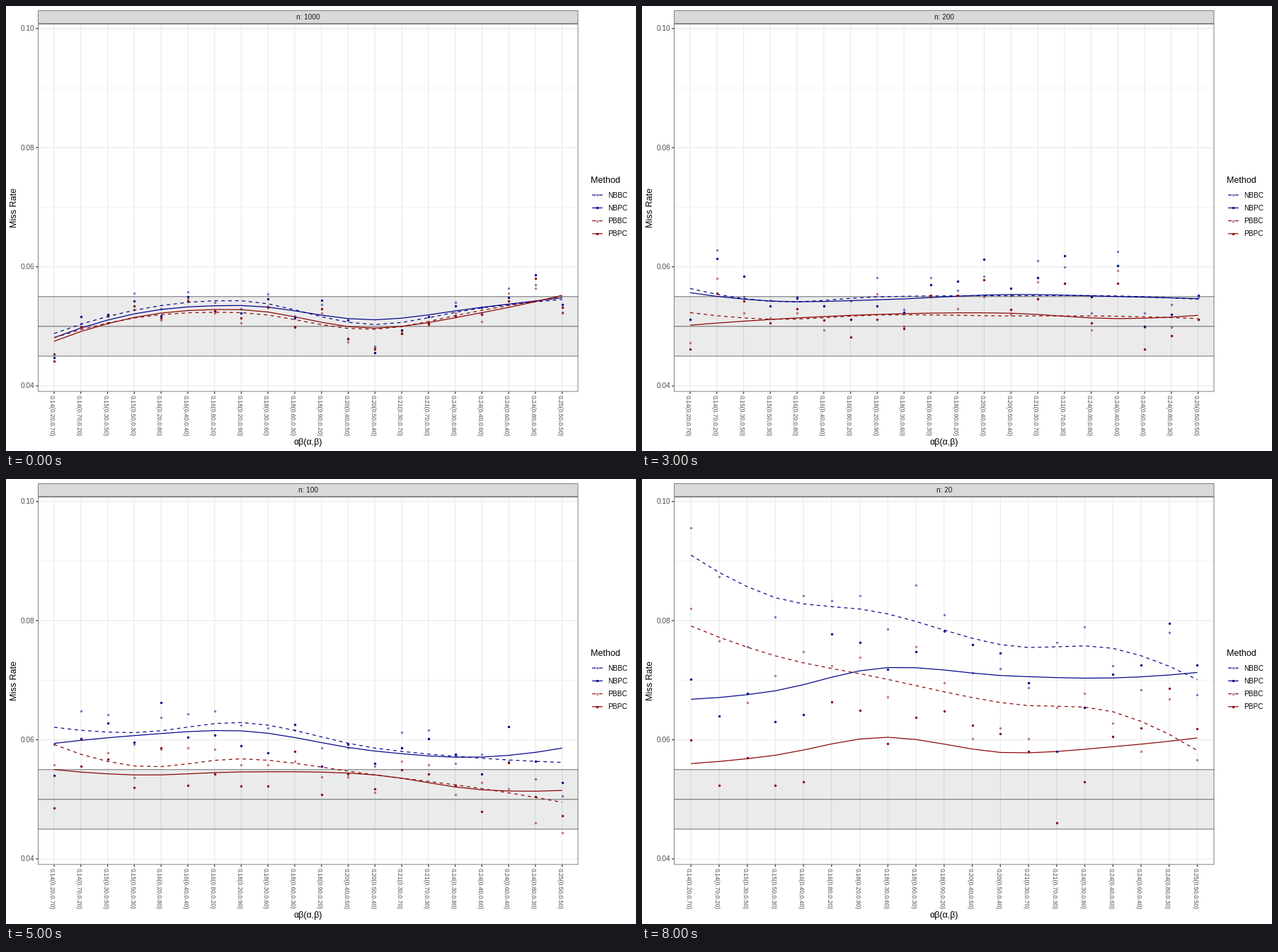
Recreate the animation shown at these times as a matplotlib script. Size 890 px wide and 629 px high, loop 9 s.

```python
import numpy as np
import matplotlib.pyplot as plt
from matplotlib.animation import FuncAnimation
from matplotlib.patches import Rectangle

W, H = 890, 629
PT = 0.72  # points per pixel at 100 dpi
LEFT, RIGHT, STRIP, TOP, BOTTOM = 45.3, 808.3, 6.3, 25.2, 545.2
MID = (LEFT + RIGHT) / 2
LINE = 1.21
GREY20, GREY30 = "#333333", "#4d4d4d"
NAVY, MAROON = "#00008b", "#8b0000"

# name, colour, line style, point opacity
METHODS = [
    ("NBBC", NAVY, (0, (4, 4)), 0.5),
    ("NBPC", NAVY, "-", 1),
    ("PBBC", MAROON, (0, (4, 4)), 0.5),
    ("PBPC", MAROON, "-", 1),
]

# Conditions: tenths (a, b) whose product lies between 0.14 and 0.25
PAIRS = sorted(((a, b) for a in range(2, 10) for b in range(2, 10)
                if 14 <= a * b <= 25), key=lambda p: (p[0] * p[1], p[0]))

# Key points of the trends along the axis, in units of 1e-4
KNOTS = np.array([0, 3, 7, 12, 16, 19]) / 19
TRENDS = {
    1000: ([488, 527, 543, 503, 531, 545], [481, 521, 535, 511, 532, 548],
           [481, 514, 523, 495, 527, 550], [475, 515, 528, 497, 523, 552]),
    250: ([524, 532, 549, 546, 545, 537], [511, 537, 550, 543, 546, 538],
          [495, 520, 533, 516, 521, 524], [476, 519, 533, 517, 516, 528]),
    150: ([603, 552, 550, 557, 557, 554], [602, 548, 539, 564, 554, 555],
          [551, 504, 505, 519, 513, 502], [528, 504, 507, 527, 510, 509]),
    100: ([621, 612, 629, 586, 569, 562], [594, 607, 615, 581, 571, 586],
          [592, 556, 568, 541, 518, 495], [550, 541, 546, 541, 516, 515]),
    50: ([649, 650, 674, 617, 626, 606], [617, 650, 650, 637, 643, 635],
         [592, 569, 583, 527, 543, 545], [522, 558, 572, 531, 545, 577]),
    20: ([910, 841, 815, 757, 752, 701], [668, 681, 720, 707, 704, 713],
         [791, 743, 705, 660, 645, 582], [560, 573, 604, 578, 589, 603]),
}
SIZES = [1000, 500, 250, 200, 150, 100, 75, 50, 20]


def trend(size):
    """Key points of one sample size, or the mean of its neighbours'."""
    if size in TRENDS:
        return np.array(TRENDS[size], float)
    i = SIZES.index(size)
    return (trend(SIZES[i - 1]) + trend(SIZES[i + 1])) / 2


def smooth(values, u):
    """Cubic Hermite curve through the key points."""
    slope = np.gradient(values, KNOTS, edge_order=2)
    i = np.clip(np.searchsorted(KNOTS, u) - 1, 0, len(KNOTS) - 2)
    h = KNOTS[i + 1] - KNOTS[i]
    t = (u - KNOTS[i]) / h
    return (values[i] * (1 + 2 * t) * (1 - t) ** 2
            + values[i + 1] * t * t * (3 - 2 * t)
            + h * t * (1 - t) * (slope[i] * (1 - t) - slope[i + 1] * t))


def scatter(curves, size):
    """Rates around the curves; methods agree more as the sample grows."""
    rng = np.random.RandomState(size)
    count = curves.shape[1]
    shared = rng.normal(0, 28, count)
    kind = rng.normal(0, 150 / np.sqrt(size), (2, count))
    own = rng.normal(0, 5, (4, count))
    rates = curves + shared + np.tile(kind, (2, 1)) + own
    return np.clip(2 * np.round(rates / 2), 420, 980)


plt.rcParams["font.family"] = "Liberation Sans"
plt.rcParams["path.snap"] = False
fig = plt.figure(figsize=(W / 100, H / 100), dpi=100, facecolor="white")
ax = fig.add_axes([0, 0, 1, 1])


def ypos(rate):
    return 368.6 - 0.842 * (np.asarray(rate) - 600)


def line(x, y, color, width=LINE, **kw):
    ax.plot(x, y, color=color, lw=width * PT, dash_capstyle="butt",
            solid_capstyle="butt", **kw)


def dots(x, y, color, alpha):
    ax.plot(x, y, "o", color=color, alpha=alpha, ms=3.4 * PT, mew=0)


def box(x0, y0, x1, y1, **kw):
    ax.add_patch(Rectangle((x0, y0), x1 - x0, y1 - y0, zorder=2, **kw))


def frame(y0, y1, fill):
    """Outline of which only the inner half of the stroke shows."""
    d = LINE / 4
    box(LEFT + d, y0 + d, RIGHT - d, y1 - d, fc=fill, ec=GREY20,
        lw=LINE / 2 * PT)


def label(x, y, s, px, color="black", ha="left", rotation=0):
    ax.text(x, y, s, fontsize=px * PT, color=color, ha=ha, va="baseline",
            rotation=rotation, rotation_mode="anchor")


def panel(xs):
    for rate in (500, 700, 900):
        line([LEFT, RIGHT], [ypos(rate)] * 2, "#ebebeb", LINE / 2)
    for rate in (400, 600, 800, 1000):
        line([LEFT, RIGHT], [ypos(rate)] * 2, "#ebebeb")
    for x in xs:
        line([x, x], [TOP, BOTTOM], "#ebebeb")
    box(LEFT, ypos(550), RIGHT, ypos(450), fc="black", alpha=0.08, lw=0)
    for rate in (450, 500, 550):
        line([LEFT, RIGHT], [ypos(rate)] * 2, "black", alpha=0.45)


def axes_text(xs, pairs):
    for rate in (400, 600, 800, 1000):
        y = ypos(rate)
        line([LEFT - 3.1, LEFT], [y, y], GREY20)
        label(39.9, y + 3.5, f"{rate / 1e4:.2f}", 10, GREY30, "right")
    for x, (a, b) in zip(xs, pairs):
        line([x, x], [BOTTOM, BOTTOM + 3.1], GREY20)
        label(x - 6.1, 550.3, f"{a * b / 100:.2f}({a / 10:.2f},{b / 10:.2f})",
              8.54, GREY30, rotation=-90)
    label(MID, 620.3, "αβ(α,β)", 12.5, ha="center")
    label(15.4, 285.2, "Miss Rate", 12.5, ha="center", rotation=90)


def legend():
    label(826.2, 250, "Method", 12.5)
    for k, (name, color, style, alpha) in enumerate(METHODS):
        y = 267.2 + 18.2 * k
        line([828.1, 842.7], [y, y], color, ls=style)
        dots([835.4], [y], color, alpha)
        label(850.4, y + 3.6, name, 10)


def draw(i):
    ax.clear()
    ax.set(xlim=(0, W), ylim=(H, 0))
    ax.axis("off")
    size = SIZES[i]
    # the smallest sample lacks one condition
    pairs = [p for p in PAIRS if size > 20 or p != (2, 8)]
    count = len(pairs)
    xs = LEFT + (RIGHT - LEFT) * (np.arange(count) + 0.6) / (count + 0.2)
    u = np.linspace(0, 1, count)
    curves = np.array([smooth(row, u) for row in trend(size)])

    panel(xs)
    for (_, color, style, _), curve in zip(METHODS, curves):
        line(xs, ypos(curve), color, ls=style)
    for (_, color, _, alpha), row in zip(METHODS, scatter(curves, size)):
        dots(xs, ypos(row), color, alpha)
    frame(TOP, BOTTOM, "none")
    frame(STRIP, TOP, "#d9d9d9")
    label(MID, 19.3, f"n: {size}", 10, "#1a1a1a", "center")
    axes_text(xs, pairs)
    legend()
    return []


anim = FuncAnimation(fig, draw, frames=len(SIZES), init_func=lambda: [],
                     interval=1000, repeat=True, repeat_delay=0)
plt.show()
```
